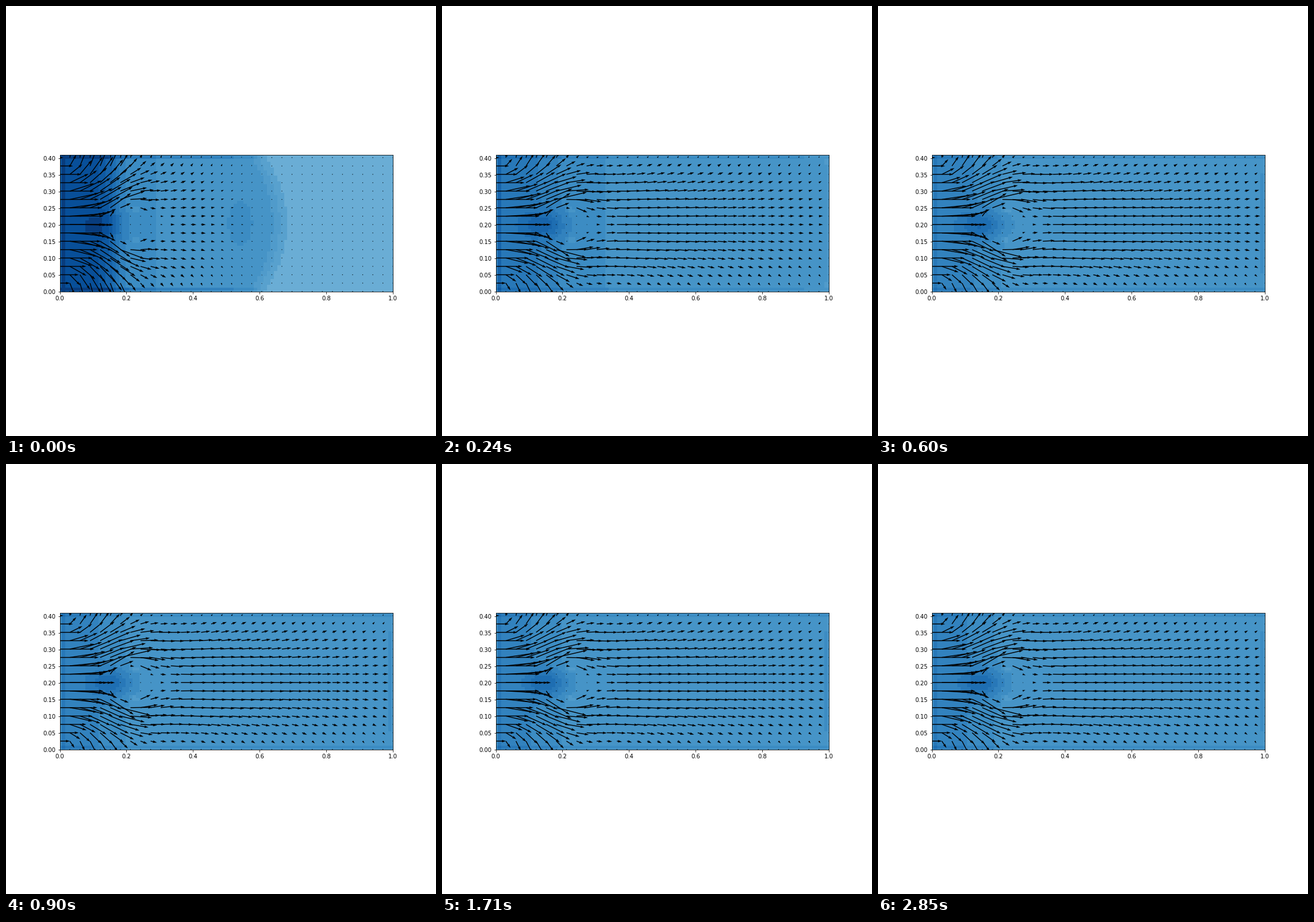
Animation of 748 by 748 pixels, one loop 9530 ms. Source, as a matplotlib script:

```python
import numpy as np
import matplotlib.pyplot as plt
from matplotlib.animation import FuncAnimation

SIZE, DPI = 748, 72
LOOP_MS, FRAMES, STEP_MS, LAST_STEP = 9530, 317, 30, 95
HEIGHT = 0.41
NX, NY, SKIP = 100, 50, 3
CENTER, RADIUS = 0.2, 0.05
INLET_PX = 77  # arrow length of the fastest inflow

X, Y = np.meshgrid(np.linspace(0, 1, NX), np.linspace(0, HEIGHT, NY))
DX, DY = 1 / (NX - 1), HEIGHT / (NY - 1)
LEVELS = np.array([0.5, 0.555, 0.58, 0.61, 0.645, 0.68, 0.72,
                   0.76, 0.80, 0.84, 0.88, 0.95])


def bell(d, width):
    return np.exp(-(d / width) ** 2)


def falloff(x, edge, width):
    return 1 / (1 + np.exp(np.clip((x - edge) / width, -60, 60)))


def velocity(t):
    """Arrow components in pixels on the thinned grid."""
    x, y = X[::SKIP, ::SKIP], Y[::SKIP, ::SKIP]
    eta = 2 * y / HEIGHT - 1
    early = np.exp(-t / 0.1)
    reach = 0.38 * np.exp(6.6 * t)
    profile = np.clip(1 - eta ** 2, 0, 1)

    # Slowing stream, faster at the shoulders of the cylinder
    speed = 0.4 + 0.6 * np.exp(-x / 0.09) - 0.49 * np.clip(x - 0.4, 0, 1)
    speed += 0.12 * bell(x - 0.2, 0.12) * (1 - bell(y - CENTER, 0.06))
    speed *= INLET_PX * profile ** 0.9 * bell(x, reach)
    speed *= 1 - 0.7 * eta ** 2 * bell(x - 0.03, 0.07)

    # Flow around the cylinder and its wake
    dx, dy = x - CENTER, y - CENTER
    r = np.maximum(np.hypot(dx, dy), 1e-6)
    angle = 2 * np.arctan2(dy, dx)
    doublet = np.minimum((RADIUS / r) ** 2, 1)
    wake = np.where(dx > 0, bell(dy, 0.065) * falloff(x, 0.33, 0.025), 0)
    skin = np.clip((r - RADIUS) / 0.012, 0, 1)
    u = speed * (1 - doublet * np.cos(angle)) * (1 - wake) * skin
    v = -speed * doublet * np.sin(angle) * (1 - wake) * skin
    v *= np.where(dx > 0, 0.9, 1)

    # Spreading towards the walls
    spread = 4.5 + 20 * bell(x - 0.11, 0.09) - 3 * (1 - early) * bell(x - 0.33, 0.08)
    spread *= np.exp(-np.minimum(x / (1.5 * reach), 4) ** 4) * (1 + 0.7 * early)
    v += eta * (1 - eta ** 24) * spread * skin * (1 - wake)

    u[:, 0], v[:, 0] = INLET_PX * profile[:, 0], 0
    for part in (u, v):
        part[0] = 0
        part[:, -1] = 0
    return u, v


def pressure(t):
    """Pressure as a colormap position, in flat bands."""
    eta = 2 * Y / HEIGHT - 1
    early = np.exp(-t / 0.1)
    front = falloff(X + 0.07 * eta ** 2, 0.665 + 5 * t, 0.015 + 1.8 * t)
    p = 0.5 + 0.11 * front

    # Passing waves
    pulse = t / 0.12 * np.exp(1 - t / 0.12)
    p += 0.035 * pulse * np.exp(-(X / 0.45) ** 4)
    p += 0.03 * np.exp(-t / 0.04) * bell(X - 0.54, 0.05) * bell(eta, 0.45)

    # Build-up ahead of the cylinder
    p += (0.075 + 0.135 * early) * falloff(X, 0.16, 0.04 - 0.025 * early)
    p += 0.05 * early * np.exp(-(X / 0.28) ** 4)
    nose = 0.152 - 0.015 * np.exp(-t / 0.5) - 0.02 * early
    p += (0.13 - 0.05 * early) * bell(X - nose, 0.06) * bell(Y - CENTER, 0.04)
    p -= 0.05 * bell(X - 0.225, 0.012) * bell(np.abs(Y - CENTER) - 0.045, 0.008)

    # Cells next to the borders
    p[:, 0] -= 0.03
    p[:, 1] += 0.05 + 0.07 * early
    for row in (1, -2):
        p[row] += front[row] * (0.035 + 0.1 * early * np.exp(-X[row] / 0.3))
    settled = 1 - np.exp(-t / 0.25)
    p[:, -2] += 0.035 * settled * (np.abs(eta[:, -2]) < 0.72)
    p[:, -1] -= 0.03 * settled
    nearest = np.abs(p[..., None] - LEVELS).argmin(axis=-1)
    return LEVELS[nearest]


side = SIZE / DPI + 1e-9  # keeps the pixel count from rounding down
fig, ax = plt.subplots(figsize=(side, side), dpi=DPI)
image = ax.imshow(pressure(0), cmap="Blues", vmin=0, vmax=1, origin="lower",
                  interpolation="nearest",
                  extent=(-DX / 2, 1 + DX / 2, -DY / 2, HEIGHT + DY / 2))
arrows = ax.quiver(X[::SKIP, ::SKIP], Y[::SKIP, ::SKIP], *velocity(0),
                   scale=1, scale_units="dots")
ax.set_xlim(0, 1)
ax.set_ylim(0, HEIGHT)


def update(frame):
    t = min(frame, LAST_STEP) * STEP_MS / 1000
    image.set_data(pressure(t))
    arrows.set_UVC(*velocity(t))
    return image, arrows


animation = FuncAnimation(fig, update, frames=FRAMES, interval=LOOP_MS / FRAMES,
                          repeat=True, repeat_delay=0)
plt.show()
```
